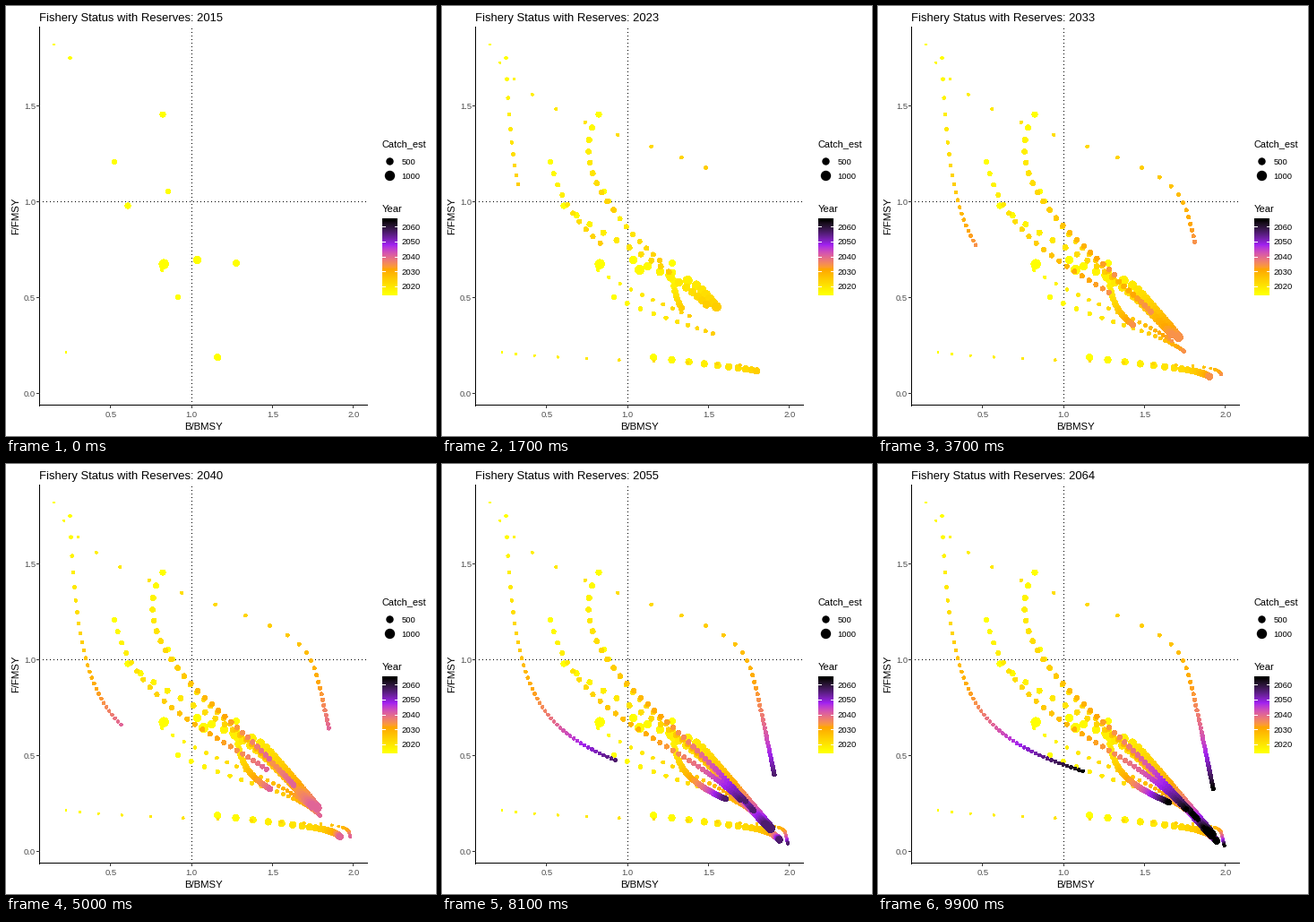
Write a matplotlib script that moves like this. It is 480x480 px and loops after 10 s.

```python
import matplotlib.pyplot as plt
import numpy as np
from matplotlib.animation import FuncAnimation

SIZE, DPI = 480, 100
PX = 72 / DPI  # points per pixel
FRAMES, FIRST, SPAN = 100, 2015, 49
LEFT, RIGHT, TOP, BOTTOM = 37, 403, 23, 445
GREY = "#4d4d4d"

plt.rcParams["font.family"] = "Liberation Sans"
fig = plt.figure(figsize=(SIZE / DPI, SIZE / DPI), dpi=DPI, facecolor="white")
ax = fig.add_axes([0, 0, 1, 1])


def to_x(b):
    return 26.9 + 180.6 * b


def to_y(f):
    return 432.5 - 214 * f


def line(xs, ys, color="black", **kw):
    # stay clear of half pixels, where snapping is ambiguous
    ax.plot(np.floor(xs) + 0.2, np.floor(ys) + 0.2, color=color, lw=PX,
            solid_capstyle="butt", antialiased=False, **kw)


def label(x, y, text, size, color="black", va="baseline", **kw):
    return ax.text(x, y, text, fontsize=size * PX, color=color, va=va, **kw)


def area(radius):
    return (2 * radius * PX) ** 2


# Colour scale, blended in CIE Lab
M_XYZ = np.array([[0.4124, 0.3576, 0.1805],
                  [0.2126, 0.7152, 0.0722],
                  [0.0193, 0.1192, 0.9505]])
WHITE = M_XYZ.sum(axis=1)


def to_lab(rgb):
    c = np.asarray(rgb) / 255
    c = np.where(c > 0.04045, ((c + 0.055) / 1.055) ** 2.4, c / 12.92)
    t = c @ M_XYZ.T / WHITE
    f = np.where(t > 0.008856, np.cbrt(t), 7.787 * t + 16 / 116)
    return np.stack([116 * f[:, 1] - 16, 500 * (f[:, 0] - f[:, 1]),
                     200 * (f[:, 1] - f[:, 2])], axis=1)


def to_rgb(lab):
    fy = (lab[:, 0] + 16) / 116
    f = np.stack([fy + lab[:, 1] / 500, fy, fy - lab[:, 2] / 200], axis=1)
    t = np.where(f > 0.2069, f ** 3, (f - 16 / 116) / 7.787)
    c = np.clip((t * WHITE) @ np.linalg.inv(M_XYZ).T, 0, 1)
    c = np.where(c > 0.0031308, 1.055 * c ** (1 / 2.4) - 0.055, 12.92 * c)
    return np.clip(c, 0, 1)


STOPS = to_lab([(255, 255, 0), (255, 165, 0), (160, 32, 240), (0, 0, 0)])


def shade(frac):
    at = np.linspace(0, 1, len(STOPS))
    return to_rgb(np.stack([np.interp(frac, at, ch) for ch in STOPS.T], axis=1))


# Schaefer surplus production under a fading cut in fishing effort
years = np.arange(SPAN + 1)


def stock(b, f, growth, cut, fade, r0, r1, pull=1.0):
    effort = f * (1 + years / fade) ** (-cut * fade)
    biomass = [b]
    for e in effort[:-1]:
        b += growth * b * (1 - (b + pull * e) / 2)
        biomass.append(b)
    radius = r1 + (r0 - r1) * np.exp(-years / 5)
    return np.stack([to_x(np.array(biomass)), to_y(effort), radius], axis=1)


stocks = [
    stock(0.148, 1.820, 0.580, 0.0536, 40, 0.8, 2.1, pull=0.225),
    stock(0.247, 1.750, 0.067, 0.0679, 14, 1.8, 1.8, pull=0.6),
    stock(0.820, 1.455, 0.500, 0.0481, 130, 3.1, 2.7, pull=0.95),
    stock(0.521, 1.208, 0.290, 0.0533, 40, 2.4, 2.6),
    stock(0.853, 1.054, 0.450, 0.0495, 70, 2.5, 2.5, pull=0.95),
    stock(0.604, 0.979, 0.620, 0.0535, 40, 3.1, 2.9),
    stock(0.826, 0.675, 1.120, 0.0455, 250, 5.1, 4.8, pull=0.95),
    stock(1.033, 0.696, 0.640, 0.0470, 100, 4.2, 4.0),
    stock(1.274, 0.680, 0.062, 0.0820, 5, 3.5, 3.0),
    stock(0.815, 0.643, 0.305, 0.0604, 25, 1.6, 1.9),
    stock(0.914, 0.502, 0.310, 0.0686, 14, 2.4, 1.9),
    stock(0.222, 0.215, 0.450, 0.0420, 500, 0.8, 1.5, pull=0.25),
    stock(1.158, 0.189, 0.300, 0.0790, 8, 3.6, 3.6),
]
count = len(stocks)
dots = np.stack(stocks, axis=1).reshape(-1, 3)  # ordered by year
colors = np.repeat(shade(years / SPAN), count, axis=0)

# Axes
line([LEFT, RIGHT], [to_y(1)] * 2, dashes=(1, 3), zorder=1)
line([to_x(1)] * 2, [BOTTOM, TOP], dashes=(1, 3), zorder=1)
line([LEFT, LEFT], [TOP, BOTTOM + 1])
line([LEFT, RIGHT], [BOTTOM, BOTTOM])
for v in (0.0, 0.5, 1.0, 1.5):
    y = to_y(v)
    line([LEFT - 3, LEFT], [y, y], "#333333")
    label(33, y + 3.6, f"{v:.1f}", 9.5, GREY, ha="right")
for v in (0.5, 1.0, 1.5, 2.0):
    x = to_x(v) - 0.3
    line([x, x], [BOTTOM, BOTTOM + 3], "#333333")
    label(x, 458.7, f"{v:.1f}", 9.5, GREY, ha="center")
label(220, 473, "B/BMSY", 11.4, ha="center")
label(11.3, 234, "F/FMSY", 11.4, va="center", ha="center", rotation=90)

# Legends
label(420, 157, "Catch_est", 11)
for y, r, text in ((173, 4.2, "500"), (189, 5.7, "1000")):
    ax.scatter([428], [y], s=area(r), c="black", lw=0, antialiased=False)
    label(441.7, y + 3.8, text, 9.5)
label(420, 230, "Year", 11.2)
bar = shade(np.linspace(1.025, -0.025, 86))[:, None, :]
ax.imshow(bar, extent=(420, 437, 323, 237), aspect="auto",
          interpolation="nearest")
for i in range(5):
    y = 313.4 - 16.7 * i
    for x in (420, 434):
        line([x, x + 3], [y, y], "white")
    label(441.7, y + 3, str(2020 + 10 * i), 9.5)
ax.set(xlim=(0, SIZE), ylim=(SIZE, 0))
ax.axis("off")

title = label(37, 17, "", 13)
points = ax.scatter([], [], lw=0, antialiased=False, zorder=3)


def draw(frame):
    pos = SPAN * frame / (FRAMES - 1)
    n = (int(np.ceil(pos)) + 1) * count
    points.set_offsets(dots[:n, :2])
    points.set_sizes(area(dots[:n, 2]))
    points.set_facecolors(colors[:n])
    title.set_text(f"Fishery Status with Reserves: {FIRST + round(pos)}")
    return points, title


anim = FuncAnimation(fig, draw, frames=FRAMES, interval=100,
                     init_func=lambda: draw(0), repeat=True)
plt.show()
```
